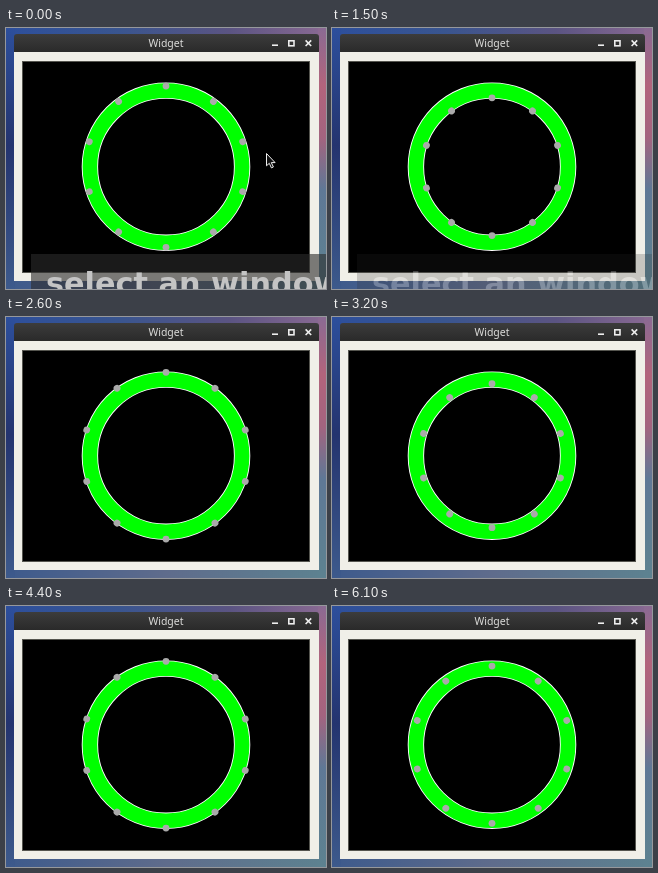
Write an HTML page that moves like this. It is 320 px wide and 261 px high and loops after 6200 ms.

```html
<!DOCTYPE html>
<html lang="en">
<head>
<meta charset="utf-8">
<title>Widget</title>
<style>
  html, body { margin: 0; width: 100%; height: 100%; overflow: hidden; }
  svg { display: block; width: 320px; height: 261px; }
  .title { font: 500 10.5px "Noto Sans", "Open Sans", sans-serif; fill: #dcdcda; text-anchor: middle; }
  .notice { font: bold 30.3px "DejaVu Sans", sans-serif; fill: #c4c4c4; }
</style>
</head>
<body>
<svg viewBox="0 0 320 261">
  <defs>
    <linearGradient id="top">
      <stop offset="0" stop-color="#2d4f9c"/>
      <stop offset=".35" stop-color="#39558f"/>
      <stop offset=".7" stop-color="#5b5482"/>
      <stop offset="1" stop-color="#8a6a93"/>
    </linearGradient>
    <linearGradient id="left" x2="0" y2="1">
      <stop offset="0" stop-color="#2d4f9c"/>
      <stop offset=".45" stop-color="#24346f"/>
      <stop offset="1" stop-color="#3d5a8c"/>
    </linearGradient>
    <linearGradient id="right" x2="0" y2="1">
      <stop offset="0" stop-color="#8a6a93"/>
      <stop offset=".22" stop-color="#b2647c"/>
      <stop offset=".42" stop-color="#a3647f"/>
      <stop offset=".62" stop-color="#5f7896"/>
      <stop offset="1" stop-color="#5d8290"/>
    </linearGradient>
    <linearGradient id="bottom">
      <stop offset="0" stop-color="#3d5a8c"/>
      <stop offset=".5" stop-color="#5f6c8c"/>
      <stop offset="1" stop-color="#5d8290"/>
    </linearGradient>
    <linearGradient id="bar" x2="0" y2="1">
      <stop offset="0" stop-color="#3c3c3c"/>
      <stop offset="1" stop-color="#2a2a2a"/>
    </linearGradient>
  </defs>

  <rect width="320" height="8" fill="url(#top)"/>
  <rect y="252" width="320" height="9" fill="url(#bottom)"/>
  <rect width="9" height="261" fill="url(#left)"/>
  <rect x="312" width="8" height="261" fill="url(#right)"/>

  <rect x="8" y="23" width="305" height="230" fill="#f0efe8"/>
  <path d="M8 24V9q0-3 3-3h299q3 0 3 3v15z" fill="url(#bar)"/>
  <text class="title" x="160" y="18.7">Widget</text>
  <g fill="none" stroke="#eee" stroke-width="1.6">
    <path d="M266 17.2h6"/>
    <rect x="282.8" y="12.8" width="5.2" height="5"/>
    <path d="M299.6 12.4l5.6 5.6m0-5.6l-5.6 5.6"/>
  </g>
  <rect x="16.5" y="33.5" width="287" height="211" stroke="#55554f"/>

  <circle cx="160" cy="138.7" r="76.1" fill="none" stroke="#fff" stroke-width="16.4"/>
  <circle cx="160" cy="138.7" r="76.1" fill="none" stroke="#0f0" stroke-width="14.6"/>
  <g id="dots" fill="#aaa" transform="translate(160 138.7)"></g>

  <g id="notice">
    <rect x="25" y="226" width="295" height="35" fill="#2c2c2c" opacity=".6"/>
    <text class="notice" x="40" y="266">select an window</text>
  </g>
  <path id="cursor" d="M260.5 125.5v12.3l2.8-2.5 2.1 4.6 2-.9-2.1-4.4h3.8z" fill="#111" stroke="#eee"/>
</svg>
<script>
  const LOOP = 6200, STEP = 100, COUNT = 10;
  const byId = id => document.getElementById(id);
  const dots = Array.from({ length: COUNT }, (_, i) => {
    const dot = document.createElementNS("http://www.w3.org/2000/svg", "circle");
    dot.setAttribute("r", 3.4);
    dot.setAttribute("transform", `rotate(${i * 360 / COUNT})`);
    return byId("dots").appendChild(dot);
  });

  function draw(ms) {
    const t = Math.floor(ms % LOOP / STEP) * STEP / 1000;
    // the pulse runs a little slower during the first second
    const phase = t < 1 ? 0.2 + 0.8 * t : t;
    const radius = 76.3 + 7.4 * Math.sin(Math.PI * phase);
    for (const dot of dots) dot.setAttribute("cy", -radius);
    byId("notice").setAttribute("opacity", Math.max(0, 1 - t / 2.3));
    byId("cursor").setAttribute("visibility", t < 0.3 ? "visible" : "hidden");
  }

  const start = performance.now();
  function tick() {
    draw(performance.now() - start);
    requestAnimationFrame(tick);
  }
  tick();
</script>
</body>
</html>
```
